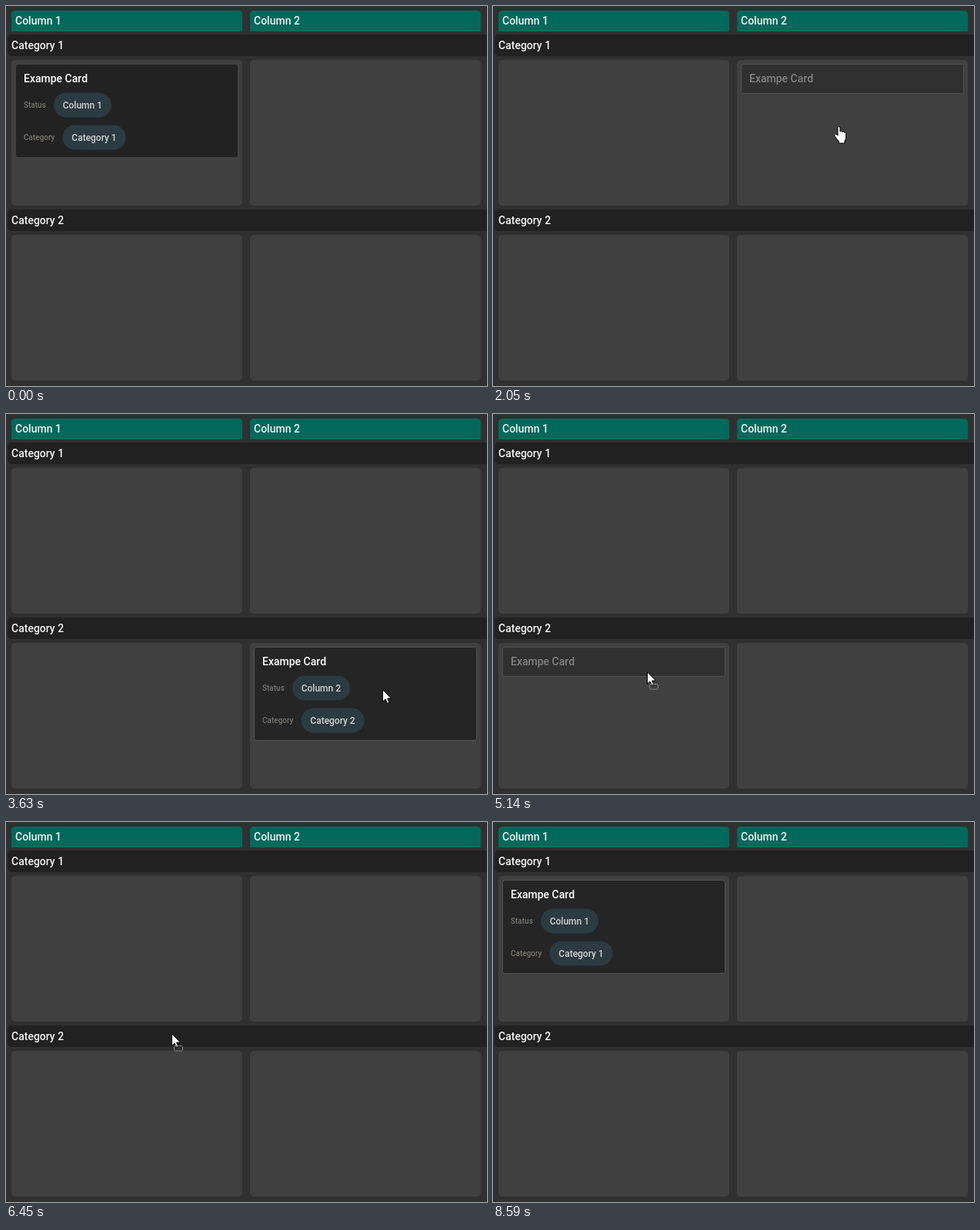
Write an HTML page that moves like this. It is 625 px wide and 493 px high and loops after 9.5 s.

```html
<!DOCTYPE html>
<html lang="en">
<head>
<meta charset="utf-8">
<title>Card board</title>
<style>
  html, body { margin: 0; width: 100%; height: 100%; overflow: hidden; background: #303030; }
  svg { display: block; }
  text { font: 500 14px Roboto, sans-serif; fill: #f2f2f2; white-space: pre; }
  .cell { fill: #404040; }
  .bar { fill: #212121; }
  .head { fill: #00695c; }
  .chip { fill: #2c3a42; }
  .title { fill: #fff; }
  .label { font-size: 10px; fill: #787572; }
  .value { font-size: 12px; fill: #cfd2d4; }
  .frame { fill: #222; stroke: none; }
  .edge .frame { fill: #252525; stroke: #545454; }
  .drag .frame { fill: #303030; stroke: #505050; }
  .drag .title { fill: #828282; }
  .drag .body { display: none; }
  .pointer { fill: #fff; stroke: #000; stroke-linejoin: round; }
</style>
</head>
<body>
<svg width="625" height="493" viewBox="0 0 625 493">
  <g id="board"></g>
  <g id="card">
    <rect class="frame" rx="3"/>
    <text class="title" x="16" y="29">Exampe Card</text>
    <g class="body">
      <text class="label" x="16" y="62">Status</text>
      <rect class="chip" x="55" y="42.5" width="75" height="32" rx="16"/>
      <text class="value" id="status" x="66.7" y="63"></text>
      <text class="label" x="16" y="104">Category</text>
      <rect class="chip" x="66.5" y="84.5" width="82" height="32" rx="16"/>
      <text class="value" id="category" x="78.3" y="105"></text>
    </g>
  </g>
  <g id="cursor">
    <g id="arrow">
      <path class="pointer" d="M.5 .8V16.2L4 12.9L6.5 18.5L9 17.4L6.6 12H11.5Z"/>
      <g id="drop" fill="none">
        <rect x="3.5" y="16.5" width="11" height="6.5" rx="1.5" stroke="#222"/>
        <rect x="3.5" y="16.5" width="11" height="6.5" rx="1.5" stroke="#eee" stroke-dasharray="1 1"/>
      </g>
    </g>
    <path id="hand" class="pointer" d="M5 2a1.5 1.5 0 0 1 3 0V7a1.5 1.5 0 0 1 2.8 .5a1.5 1.5 0 0 1 2.7 .8a1.3 1.3 0 0 1 2.2 1V14q0 3-1.7 5v3H6.3v-2.5Q4 17 1 12.7q-1-2 .8-2.7q1.4-.2 3.2 2.2z"/>
  </g>
</svg>
<script>
const LOOP = 9500, COL = 310, ROW = 227;
const $ = id => document.getElementById(id);

function add(tag, attrs, text = '') {
  const el = document.createElementNS('http://www.w3.org/2000/svg', tag);
  for (const key in attrs) el.setAttribute(key, attrs[key]);
  el.textContent = text;
  $('board').append(el);
}

for (let i = 0; i < 2; i++) {
  const x = 7 + i * COL, y = i * ROW;
  add('path', { class: 'head', d: `M${x} 33V11q0-5 5-5h290q5 0 5 5V33z` });
  add('text', { x: x + 5, y: 24 }, `Column ${i + 1}`);
  add('rect', { class: 'bar', x: 2, y: 37 + y, width: 640, height: 28, rx: 5 });
  add('text', { x: 7, y: 56 + y }, `Category ${i + 1}`);
  for (let c = 0; c < 2; c++)
    add('rect', { class: 'cell', x: 7 + c * COL, y: 70 + y, width: 300, height: 189, rx: 5 });
}

// time, cursor kind, cursor x, y, card look, column, row
const steps = [
  [0, '', 0, 0, 'flat', 0, 0],
  [710, 'arrow', 380, 177, 'flat', 0, 0],
  [830, 'arrow', 266, 153, 'flat', 0, 0],
  [950, 'arrow', 191, 139, 'flat', 0, 0],
  [1380, 'arrow', 193, 139, 'flat', 0, 0],
  [1530, 'drop', 199, 141, 'drag', 0, 0],
  [1680, 'drop', 236, 148, 'drag', 0, 0],
  [1800, 'drop', 326, 158, 'drag', 1, 0],
  [1920, 'drop', 408, 160, 'drag', 1, 0],
  [2050, 'hand', 443, 156, 'drag', 1, 0],
  [2200, 'arrow', 454, 135, 'edge', 1, 0],
  [2350, 'arrow', 455, 116, 'edge', 1, 0],
  [2490, 'arrow', 469, 112, 'edge', 1, 0],
  [2610, 'arrow', 481, 110, 'edge', 1, 0],
  [2910, 'drop', 482, 164, 'drag', 1, 0],
  [3030, 'drop', 482, 262, 'drag', 1, 0],
  [3180, 'drop', 481, 353, 'drag', 1, 1],
  [3330, 'drop', 481, 359, 'drag', 1, 1],
  [3490, 'drop', 482, 358, 'drag', 1, 1],
  [3630, 'arrow', 489, 357, 'edge', 1, 1],
  [3750, 'arrow', 511, 346, 'edge', 1, 1],
  [3910, 'arrow', 516, 342, 'edge', 1, 1],
  [4590, 'arrow', 515, 342, 'edge', 1, 1],
  [4740, 'drop', 500, 344, 'drag', 1, 1],
  [4860, 'drop', 415, 347, 'drag', 1, 1],
  [5010, 'drop', 270, 343, 'drag', 0, 1],
  [5140, 'drop', 200, 334, 'drag', 0, 1],
  [5440, 'arrow', 200, 334, 'edge', 0, 1],
  [5590, 'arrow', 211, 336, 'edge', 0, 1],
  [5710, 'arrow', 219, 337, 'edge', 0, 1],
  [6450, 'drop', 215, 274, '', 0, 0],
  [6570, 'drop', 216, 180, 'drag', 0, 0],
  [6690, 'drop', 217, 132, 'drag', 0, 0],
  [6840, 'drop', 217, 127, 'drag', 0, 0],
  [7280, 'arrow', 217, 127, 'edge', 0, 0],
  [8590, '', 0, 0, 'edge', 0, 0]
];

const show = (id, on) => { $(id).style.display = on ? '' : 'none'; };
const frame = document.querySelector('.frame');
let shown;

function render(step) {
  const [, kind, x, y, look, col, row] = step;
  show('cursor', kind);
  show('arrow', kind !== 'hand');
  show('drop', kind === 'drop');
  show('hand', kind === 'hand');
  $('cursor').setAttribute('transform', `translate(${x} ${y})`);

  show('card', look);
  $('card').setAttribute('class', look);
  $('card').setAttribute('transform', `translate(${7 + col * COL} ${70 + row * ROW})`);
  $('status').textContent = `Column ${col + 1}`;
  $('category').textContent = `Category ${row + 1}`;

  const inset = look === 'flat' ? 6 : 5.5;
  const height = { flat: 120, edge: 121, drag: 38 }[look] || 0;
  const box = { x: inset, y: look === 'drag' ? 5 : inset, width: 300 - 2 * inset, height };
  if (look === 'drag') box.y = 5.5;
  for (const key in box) frame.setAttribute(key, box[key]);
}

function tick() {
  const t = performance.now() % LOOP;
  const step = steps.findLast(s => s[0] <= t);
  if (step !== shown) render(shown = step);
  requestAnimationFrame(tick);
}
tick();
</script>
</body>
</html>
```
